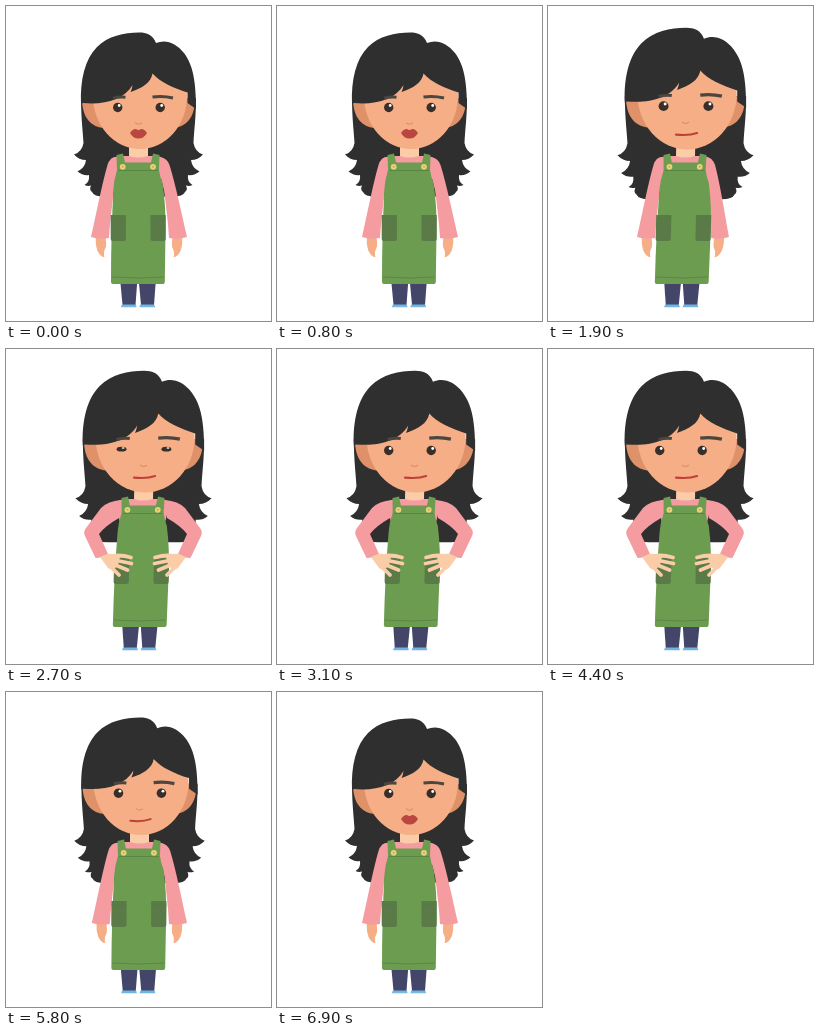
Write an HTML page with a canvas that moves like this. It is 265 px wide and 315 px high and loops after 7200 ms.

```html
<!DOCTYPE html>
<html lang="en">
<head>
<meta charset="utf-8">
<title>Woman in a green apron</title>
<style>
html, body { margin: 0; width: 100%; height: 100%; overflow: hidden; background: #fff; }
canvas { display: block; width: 265px; height: 315px; }
</style>
</head>
<body>
<canvas id="stage" width="265" height="315"></canvas>
<script>
const ctx = document.getElementById('stage').getContext('2d');
const LOOP = 7200, STEP = 100;
const C = {
  hair: '#2f2f2f', skin: '#f6ae86', pale: '#fbcca8', shade: '#df916a', brow: '#4b4640', eye: '#382f2b',
  lips: '#b9473f', line: '#bf4038', pink: '#f59ca0', green: '#6c9c50', pocket: '#5a7b47',
  stitch: '#557c40', button: '#ead27a', jeans: '#434668', shoe: '#6fb4e2', sole: '#dcebf5'
};

function fill(color, d) {
  ctx.fillStyle = color;
  ctx.fill(new Path2D(d));
}

function stroke(color, width, d, cap = 'round') {
  ctx.strokeStyle = color;
  ctx.lineWidth = width;
  ctx.lineCap = cap;
  ctx.lineJoin = 'round';
  ctx.stroke(new Path2D(d));
}

function oval(color, x, y, rx, ry = rx) {
  ctx.fillStyle = color;
  ctx.beginPath();
  ctx.ellipse(x, y, rx, ry, 0, 0, Math.PI * 2);
  ctx.fill();
}

function within(matrix, draw) {
  ctx.save();
  ctx.transform(...matrix);
  draw();
  ctx.restore();
}

// The head grows slightly around the mouth while it turns to the right.
function headMatrix(turn) {
  const sx = 1 + 0.055 * turn, sy = 1 + 0.045 * turn;
  return [sx, 0, 0, sy, 5 * turn + 132.5 * (1 - sx), 132 * (1 - sy)];
}

// Horizontal lean: `top` pixels at shoulder height, changing by `slope` per pixel below it.
const lean = (turn, top, slope) => [1, 0, -slope * turn, 1, (top + 150 * slope) * turn, 0];

function backHair() {
  fill(C.hair, `M75 92 C75 112 77 126 77.5 137 Q76 146 68 148.5 Q73 154 80 154
    Q79 162 71.5 165.5 Q77 170 83 169 Q84 176 78.5 179 Q82 180.5 85 179.5
    Q83 184 86 186 Q88 190.5 98 190.5 L167 190.5 Q177 190.5 179 186 Q182 184 180 179.5
    Q183 180.5 186.5 179 Q181 176 182 169 Q188 170 193.5 165.5 Q186 162 185 154
    Q192 154 197 148.5 Q189 146 187.5 137 C188 124 190 112 190 92 Z`);
}

function legs() {
  for (const x of [114, 132.5]) {
    fill(C.jeans, `M${x} 272 h17.5 l-2 27 h-13 Z`);
    fill(C.shoe, `M${x + 2} 298.5 h13.5 q1 1 1 2.8 h-15.5 q0 -1.8 1 -2.8 Z`);
    fill(C.sole, `M${x + 1} 300.9 h15.5 v.8 h-15.5 Z`);
  }
}

function torso() {
  fill(C.pink, 'M105 153 Q109 150 118 150 H147 Q156 150 159 154 L154 176 H110 Z');
  fill(C.pale, 'M123 136 H142 V150 Q132 153 123 150 Z');
}

function apron() {
  fill(C.green, `M110.5 149 L117 147.5 L119 156.5 H145 L147 147.5 L153.5 149 L153 164
    Q154 171 156.5 177 Q160 200 159.5 225 L158.8 276 Q158.7 278 157 278 H107
    Q105 278 105 276 Q105 225 107.5 182 Q108 174 111 164 Z`);
  stroke(C.stitch, 0.7, 'M112 164.5 H152 M106 271 Q132 273 158 271', 'butt');
  for (const x of [104.7, 144.5]) {
    fill(C.pocket, `M${x} 209 h15.2 v24 q0 2 -2 2 h-11.2 q-2 0 -2 -2 Z`);
    stroke(C.stitch, 0.8, `M${x} 213 h15.2`, 'butt');
  }
  for (const x of [116.7, 147]) {
    oval(C.button, x, 160.8, 2.9);
    oval('#c9ad56', x, 160.8, 1);
  }
}

function hangingArms(turn) {
  within([1, 0, 0, 1, 4 * turn, 0], () => {
    fill(C.skin, 'M90 229 H99 Q101 238 99.5 242 Q97 246 98.5 251 Q95 251.5 91.5 245 Q89 238 90 229 Z');
    fill(C.pink, `M110 151 Q104 151 101.5 159 C96 178 92 200 85 231 Q94 234 103 232
      C104 215 106 200 108 184 L112 165 Z`);
  });
  within(lean(turn, 4, 0.05), () => {
    fill(C.skin, 'M167 229 H176 Q177 238 174.5 245 Q171 251.5 167.5 251 Q169 246 166.5 242 Q165 238 167 229 Z');
    fill(C.pink, `M154 151 Q161 152 163.5 159 C170 180 175 205 181 231 Q172 234 163 232
      C162 215 160 200 158 184 L153 165 Z`);
  });
}

function hipArm() {
  fill(C.pink, `M115 151 Q102 152 95 159 L80 179 Q77 183 79 187 L89.5 209
    Q96 209 102 205 L93 185 Q99 177 113 169 Z`);
}

function hipHand() {
  fill(C.pale, 'M94 208 L101 205 Q109 204 114 208 L112 216 Q107 223 102 219 Z');
  stroke(C.pale, 3.8, 'M106 207 Q115 205.5 125 208.5 M108 211 L125.5 214.5 M107 215 L121.5 221 M104 217 L113 226');
}

function bothSides(draw) {
  draw();
  within([-1, 0, 0, 1, 274, 0], draw);
}

function face() {
  fill(C.shade, 'M76 92 C76 112 85 121.5 99 122 H166 C180 121.5 189 112 189 92 Z');
  oval(C.skin, 134, 90, 47, 53);
}

function features(flatMouth) {
  stroke(C.brow, 3, 'M107 92.2 Q114 90.5 119.5 91.3', 'butt');
  stroke(C.brow, 3.2, 'M146.5 91 Q157 89.6 167 92', 'butt');
  stroke(C.shade, 1.2, 'M129.5 117 Q132.5 119.5 135.5 117');
  if (flatMouth) {
    stroke(C.line, 2, 'M123.5 128.8 Q136 130 143.5 127.2');
  } else {
    fill(C.lips, `M124 127 Q127 122.5 130 123 Q132.5 125 135 123 Q138 122.5 141 127
      Q138 132.5 132.5 132.5 Q127 132.5 124 127 Z`);
  }
}

function frontHair() {
  fill(C.hair, `M75 98 C74 74 79 53 91 41 C102 30 118 26.5 133 26.5
    C141 26.5 147 29 150 37 C160 33 170 37 178 47 C187 59 190 75 190 103
    L181.5 97 V86.5 C167 82 154 76 146.5 67.5 C145 77 136 82 124.5 86 Q126 83 126.5 79
    C118 94 98 99 77 97 Z`);
}

function eyes(open) {
  for (const x of [111.7, 154.2]) {
    if (open === 0) {
      stroke(C.eye, 1.5, `M${x - 4} 101.5 q4 2.6 8 0`);
    } else {
      oval(C.eye, x, 101.5, 4.7, 4.7 * open);
      oval('#fff', x + 1.5, 101.5 - 2 * open, 1.4, 1.4 * open);
    }
  }
}

function eyeOpening(t) {
  for (const start of [500, 4100, 6600]) {
    const i = (t - start) / STEP;
    if (i >= 0 && i < 3) return [0.5, 0, 0.5][i];
  }
  const i = (t - 2700) / STEP;
  return i >= 0 && i < 4 ? [0.5, 0, 0, 0.5][i] : 1;
}

function turnAmount(t) {
  const rise = (t - 1400) / 500, fall = (5900 - t) / 500;
  return Math.max(0, Math.min(1, rise, fall));
}

function drawScene(t) {
  const turn = turnAmount(t);
  const onHips = t >= 2000 && t < 5400;
  const gaze = t >= 2900 && t < 5400 ? 0 : turn;
  const flatMouth = t >= 1600 && t < 5900;
  const head = headMatrix(turn), body = lean(turn, 5, 0.025);

  ctx.fillStyle = '#fff';
  ctx.fillRect(0, 0, 265, 315);
  within(head, backHair);
  within(body, () => { legs(); torso(); });
  if (onHips) bothSides(hipArm);
  else hangingArms(turn);
  within(body, apron);
  if (onHips) bothSides(hipHand);
  within(head, () => { face(); frontHair(); features(flatMouth); });
  within(headMatrix(gaze), () => eyes(eyeOpening(t)));
}

const begin = performance.now();
function tick() {
  const t = (performance.now() - begin) % LOOP;
  drawScene(Math.floor(t / STEP) * STEP);
  requestAnimationFrame(tick);
}
tick();
</script>
</body>
</html>
```
